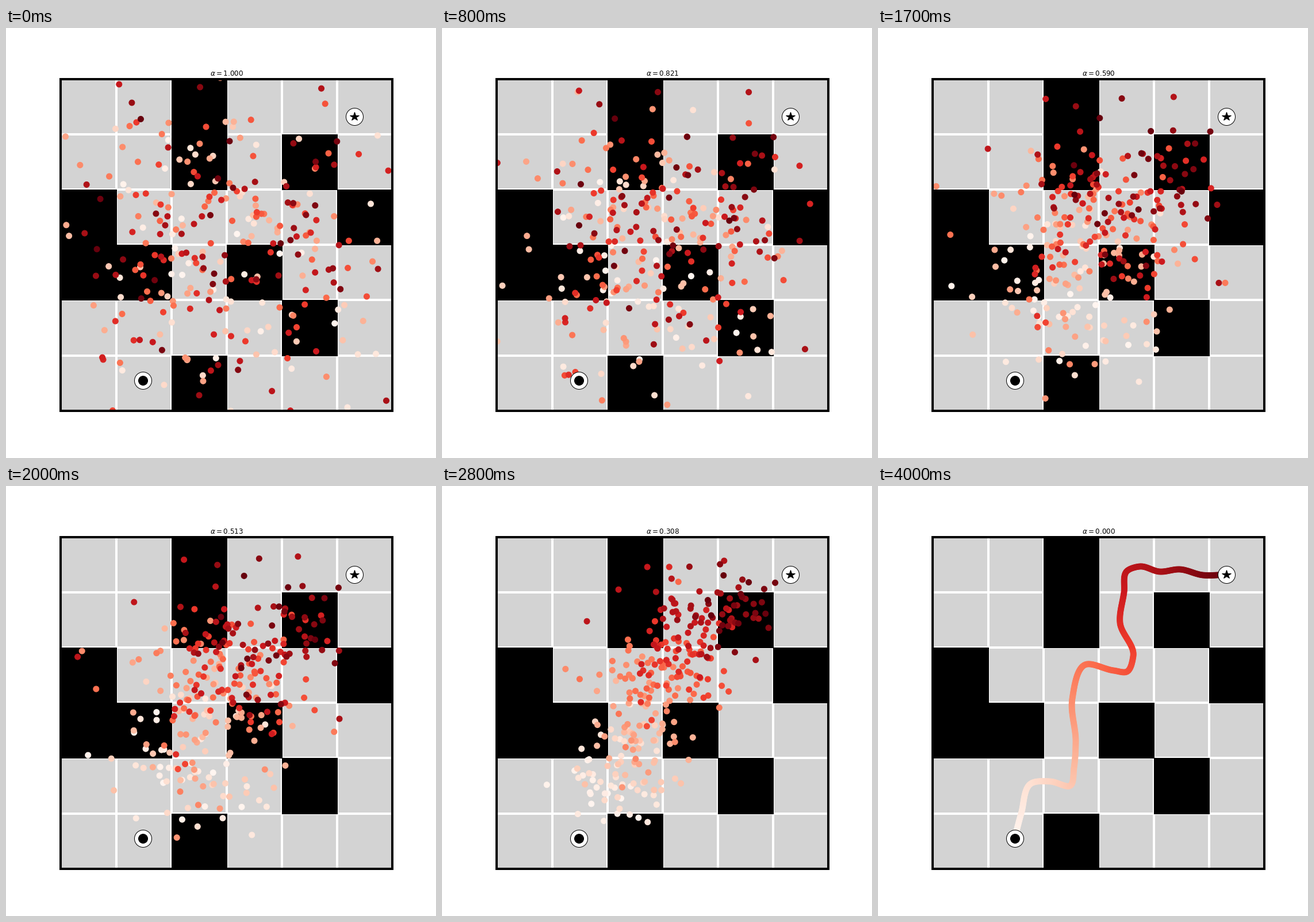
Write a matplotlib script that moves like this. It is 748 by 748 pixels and loops after 5100 ms.

```python
import numpy as np
import matplotlib.pyplot as plt
from matplotlib.animation import FuncAnimation
from matplotlib.patches import Rectangle

STAGE, DPI = 748, 72
LEFT, TOP, SIDE = 95.47, 89.06, 576.58
CELLS = 6
CELL = SIDE / CELLS
CENTER = np.array([LEFT + SIDE / 2, TOP + SIDE / 2])
STEPS, FRAMES, INTERVAL = 39, 51, 100
COUNT = 300
START, GOAL = (237.6, 613.1), (606.1, 154.1)

# One string per row of the maze; '#' is a wall.
MAZE = ["..#...", "..#.#.", "#....#", "##.#..", "....#.", "..#..."]

WAYPOINTS = np.array([
    START, (249, 570), (267, 517), (300, 514), (335, 521), (341, 490),
    (344, 445), (338, 370), (360, 311), (410, 321), (433, 323), (444, 296),
    (421, 238), (428, 185), (433, 148), (455, 140), (490, 149), (525, 145),
    (565, 155), GOAL])


def chord_lengths(points):
    return np.r_[0, np.cumsum(np.hypot(*np.diff(points, axis=0).T))]


def smooth_curve(points, samples=800):
    """Cubic Hermite curve through the points."""
    knots = chord_lengths(points)
    slopes = np.gradient(points, knots, axis=0)
    t = np.linspace(0, knots[-1], samples)
    i = np.clip(np.searchsorted(knots, t, "right") - 1, 0, len(points) - 2)
    span = (knots[i + 1] - knots[i])[:, None]
    u = (t - knots[i])[:, None] / span
    ease = u * u * (3 - 2 * u)
    return ((1 - ease) * points[i] + ease * points[i + 1]
            + span * u * (1 - u) * ((1 - u) * slopes[i] - u * slopes[i + 1]))


def along(curve, progress):
    """Points at the given fractions of the curve's length."""
    lengths = chord_lengths(curve)
    return np.column_stack([np.interp(progress, lengths / lengths[-1], axis)
                            for axis in curve.T])


rng = np.random.default_rng(0)
progress = np.linspace(0, 1, COUNT)
noise = CENTER + rng.normal(0, SIDE / 4, (COUNT, 2))
route = along(smooth_curve(WAYPOINTS), progress)

fig = plt.figure(figsize=(STAGE / DPI, STAGE / DPI), dpi=DPI, facecolor="white")
ax = fig.add_axes([LEFT / STAGE, 1 - (TOP + SIDE) / STAGE, SIDE / STAGE, SIDE / STAGE])
ax.set(xlim=(LEFT, LEFT + SIDE), ylim=(TOP + SIDE, TOP),
       xticks=[], yticks=[], facecolor="lightgray")
for spine in ax.spines.values():
    spine.set_linewidth(4)

for i in range(1, CELLS):
    ax.axvline(LEFT + i * CELL, color="white", lw=4, zorder=0.5)
    ax.axhline(TOP + i * CELL, color="white", lw=4, zorder=0.5)
for row, line in enumerate(MAZE):
    for col, kind in enumerate(line):
        if kind == "#":
            ax.add_patch(Rectangle((LEFT + col * CELL, TOP + row * CELL),
                                   CELL, CELL, color="black", lw=1, zorder=1))

dots = ax.scatter(*noise.T, s=100, c=progress, cmap="Reds", vmin=0, vmax=1, zorder=2)
for spot, marker in ((START, "o"), (GOAL, "*")):
    ax.plot(*spot, "o", ms=30, mfc="white", mec="black", mew=1, zorder=4)
    ax.plot(*spot, marker, ms=16, color="black", zorder=5)
title = ax.set_title("", fontsize=12, pad=6)


def update(frame):
    alpha = 1 - np.clip(frame - 1, 0, STEPS) / STEPS
    dots.set_offsets(alpha * noise + (1 - alpha) * route)
    title.set_text(rf"$\alpha = {alpha:.3f}$")
    return dots, title


anim = FuncAnimation(fig, update, frames=FRAMES, interval=INTERVAL,
                     repeat=True, repeat_delay=0)
plt.show()
```
